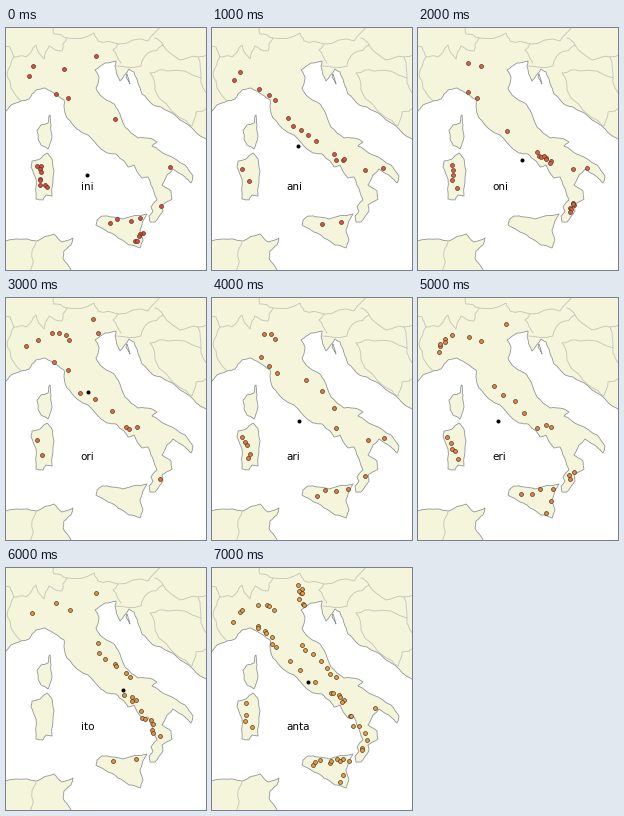
These frames come from a looping animation (200x242 px, 8000 ms). A matplotlib script:

```python
import colorsys

import matplotlib.pyplot as plt
import numpy as np
from matplotlib.animation import FuncAnimation
from matplotlib.patches import Polygon

W, H, DPI = 200, 242, 100
PX = 72 / DPI  # one pixel in points
LAND, COAST, BORDER = "#f5f5dc", "#8c9292", "#c6c6ba"

# Key points of the coasts, in stage pixels; roughen() adds the detail
WEST = [
    (-3, 85), (5, 77), (15, 73), (23, 71), (30, 62), (39, 60), (51, 67),
    (58, 72), (58, 79), (61, 90), (71, 101), (82, 107), (95, 121), (101, 125),
    (110, 126), (118, 133), (122, 139), (128, 137), (136, 150), (142, 149),
    (148, 164), (151, 172), (145, 179), (147, 183), (143, 188), (144, 194)]
EAST = [
    (149, 194), (157, 183), (156, 177), (166, 171), (165, 163), (156, 157),
    (161, 147), (167, 141), (179, 149), (185, 155), (187, 148), (179, 137),
    (161, 127), (146, 118), (151, 114), (146, 111), (132, 110), (119, 99),
    (112, 82), (108, 76), (94, 67), (90, 60), (93, 49), (89, 42), (99, 35),
    (110, 33)]
BALKANS = [
    (109, 38), (114, 53), (123, 41), (128, 44), (133, 58), (136, 66),
    (146, 76), (155, 79), (170, 88), (187, 101), (203, 113)]
CORNERS = [(203, -3), (-3, -3)]
ISLANDS = [
    # Corsica, Sardinia, Sicily, Cres
    [(44, 87), (45, 97), (46, 109), (42, 121), (35, 117), (32, 111),
     (31, 102), (35, 97), (42, 95), (43, 88)],
    [(41, 125), (46, 131), (48, 143), (46, 168), (40, 167), (37, 172),
     (30, 171), (30, 151), (25, 139), (26, 133), (34, 131)],
    [(91, 192), (96, 188), (106, 189), (117, 191), (141, 186), (134, 202),
     (137, 212), (134, 220), (123, 217), (112, 210), (99, 202), (90, 197)],
    [(121, 46), (124, 56), (120, 49)]]
AFRICA = [
    (-3, 213), (10, 211), (31, 213), (48, 206), (56, 214), (67, 210),
    (65, 217), (58, 223), (57, 230), (62, 237), (66, 245), (-3, 245)]
BORDERS = [
    # Alps
    [(15, 73), (5, 60), (1, 46), (8, 29), (20, 29), (30, 17), (38, 31),
     (43, 18), (56, 23), (61, 10), (88, 5), (92, 13), (112, 16), (142, 13),
     (155, -2)],
    [(8, 29), (4, 19), (-2, 19)],
    [(61, 10), (48, 6), (47, -2)],
    # Slovenia, Croatia and Bosnia
    [(112, 16), (107, 22), (115, 35)],
    [(149, 10), (157, 17), (142, 25), (135, 38), (110, 38)],
    [(157, 17), (174, 32), (192, 29), (202, 27)],
    [(192, 29), (195, 50), (162, 43), (144, 45), (149, 62), (173, 89),
     (186, 98), (190, 84), (202, 80)],
    [(195, 50), (197, 60), (202, 66)],
    # Tunisia
    [(30, 214), (26, 223), (24, 244)]]

# Each region scatters its places along a line
REGIONS = {
    "piedmont": [(18, 54), (34, 37)],
    "lombardy": [(46, 34), (66, 43)],
    "veneto": [(86, 15), (92, 38)],
    "liguria": [(44, 58), (66, 78)],
    "latium": [(70, 87), (110, 117)],
    "adriatic": [(88, 74), (126, 114)],
    "campania": [(118, 126), (134, 133)],
    "lucania": [(133, 143), (153, 167)],
    "apulia": [(147, 138), (179, 144)],
    "calabria": [(157, 172), (149, 184)],
    "sicily": [(100, 196), (138, 190)],
    "noto": [(134, 201), (130, 216)],
    "sardinia": [(31, 134), (39, 163)]}

# Name ending, centre of its places, number of places per region
STEPS = [
    ("ini", (80.5, 147), dict(piedmont=2, lombardy=1, veneto=1, liguria=2,
                              adriatic=1, apulia=1, calabria=1, sicily=4,
                              noto=5, sardinia=9)),
    ("ani", (86, 118), dict(piedmont=2, liguria=3, latium=5, campania=4,
                            apulia=2, sicily=2, sardinia=2)),
    ("oni", (103.5, 131.5), dict(lombardy=2, liguria=2, latium=1, campania=8,
                                 apulia=2, calabria=6, sardinia=5)),
    ("ori", (82, 94), dict(piedmont=2, lombardy=4, veneto=2, liguria=2,
                           latium=3, campania=3, calabria=1, sardinia=2)),
    ("ari", (87, 123), dict(lombardy=3, liguria=3, adriatic=3, campania=1,
                            apulia=2, calabria=1, sicily=4, sardinia=5)),
    ("eri", (80, 123), dict(piedmont=6, lombardy=2, veneto=1, latium=4,
                            campania=3, calabria=3, sicily=4, noto=2,
                            sardinia=5)),
    ("ito", (117, 121.5), dict(piedmont=1, lombardy=2, veneto=1, adriatic=7,
                               campania=4, lucania=8, sicily=2)),
    ("anta", (96, 113.5), dict(piedmont=3, lombardy=4, veneto=8, liguria=7,
                               latium=3, adriatic=7, campania=6, lucania=5,
                               apulia=1, calabria=3, sicily=9, noto=2,
                               sardinia=4))]


def roughen(points, rng, depth=2, amount=0.07):
    """Push the middle of every segment sideways, again and again."""
    pts = np.array(points, float)
    for _ in range(depth):
        step = np.diff(pts, axis=0)
        normal = step[:, ::-1] * (-1, 1)
        shift = rng.uniform(-amount, amount, (len(step), 1))
        mid = pts[:-1] + step / 2 + normal * shift
        pts = np.insert(pts, np.arange(1, len(pts)), mid, axis=0)
    return pts


def scatter(counts, seed):
    rng = np.random.default_rng(seed)
    rows = []
    for name, n in counts.items():
        start, end = np.array(REGIONS[name], float)
        t = (np.arange(n) + 0.5) / n
        rows.append(start + t[:, None] * (end - start)
                    + rng.uniform(-3, 3, (n, 2)))
    return np.vstack(rows)


def dot_colour(i):
    return colorsys.hsv_to_rgb((3 + 5 * i) / 360, 0.7, 0.86)


fig = plt.figure(figsize=(W / DPI, H / DPI), dpi=DPI, facecolor="white")
ax = fig.add_axes([0, 0, 1, 1])
ax.set_xlim(0, W)
ax.set_ylim(H, 0)
ax.axis("off")

rng = np.random.default_rng(4)
mainland = np.vstack([roughen(WEST + EAST + BALKANS, rng), CORNERS])
lands = [mainland, roughen(AFRICA, rng)]
lands += [roughen(isle + isle[:1], rng) for isle in ISLANDS]
for land in lands:
    ax.add_patch(Polygon(land, fc=LAND, ec=COAST, lw=0.8 * PX,
                         joinstyle="round"))
for border in BORDERS:
    ax.plot(*roughen(border, rng, amount=0.12).T, color=BORDER, lw=0.9 * PX)

places, = ax.plot([], [], "o", ms=3.9 * PX, mec="#5f3322", mew=0.7 * PX,
                  zorder=4)
centre, = ax.plot([], [], "o", ms=4 * PX, color="black", mew=0, zorder=5)
label = ax.text(74.5, 161.5, "", fontsize=10.4 * PX, family="DejaVu Sans",
                color="black", va="baseline", zorder=6)


def update(i):
    ending, mid, counts = STEPS[i]
    places.set_data(*scatter(counts, i).T)
    places.set_markerfacecolor(dot_colour(i))
    centre.set_data([mid[0]], [mid[1]])
    label.set_text(ending)
    return places, centre, label


anim = FuncAnimation(fig, update, frames=len(STEPS), interval=1000,
                     repeat=True, repeat_delay=0)
plt.show()
```
